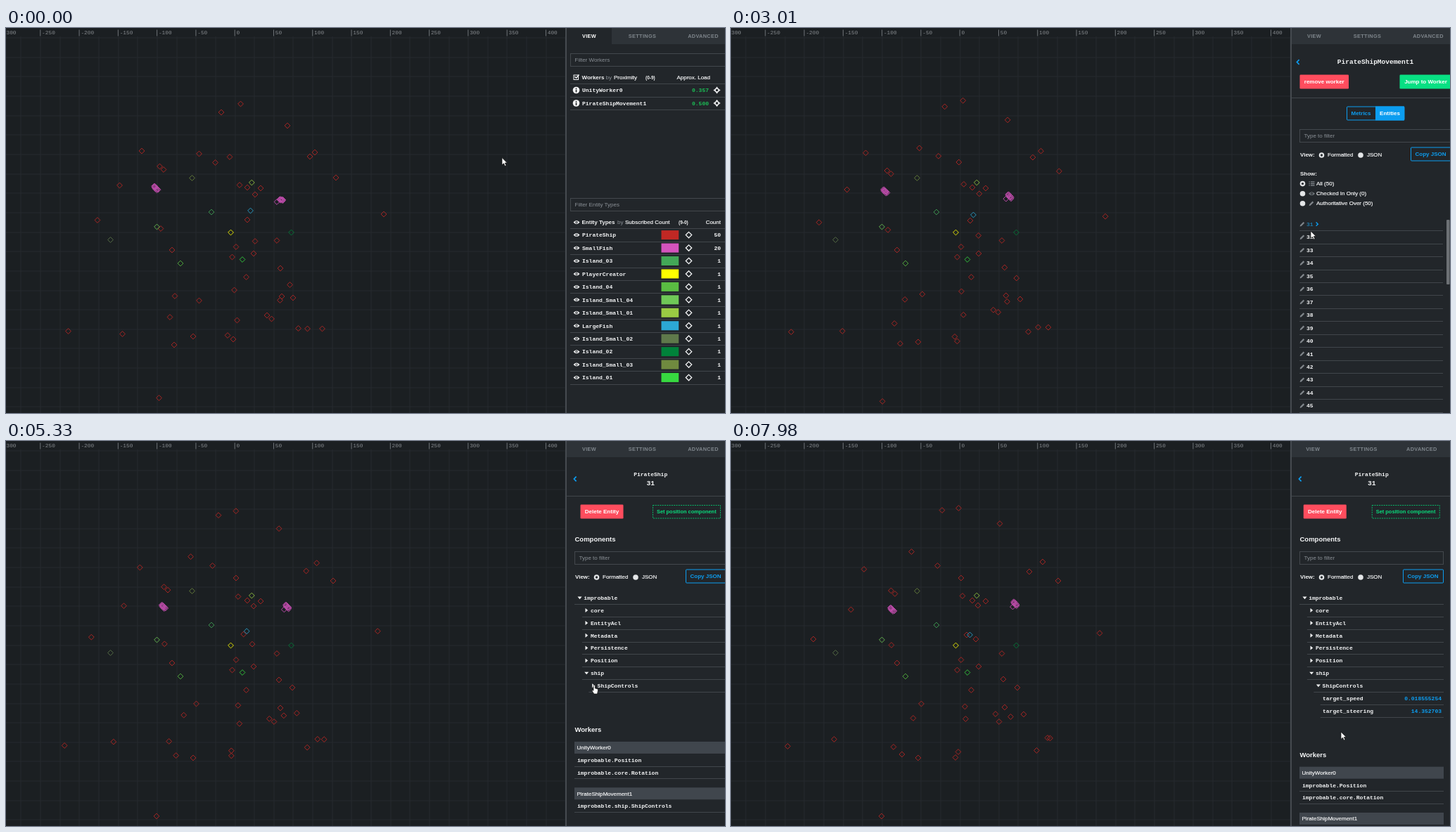
Recreate the animation shown at these times as an HTML page. Size 1022x548 px, loop 8 s.

```html
<!DOCTYPE html>
<html lang="en">
<head>
<meta charset="utf-8">
<title>World inspector</title>
<style>
html, body { margin: 0; width: 100%; height: 100%; overflow: hidden; background: #1b1f22; }
svg { display: block; width: 1022px; height: 548px; }
text { font: 8px "Liberation Sans", Arial, sans-serif; fill: #f4f5f6; white-space: pre; }
.b { font-weight: bold; }
.m { font-family: "Liberation Mono", "Courier New", monospace; }
.s { stroke: #f4f5f6; stroke-width: .2px; }
.e { text-anchor: end; }
.c { text-anchor: middle; }
.tab { font-size: 7.3px; letter-spacing: .35px; font-weight: bold; }
</style>
</head>
<body>
<svg id="stage" viewBox="0 0 1022 548"></svg>
<script>
const LOOP = 8000;
const BLUE = '#0c9df0', WHITE = '#f4f5f6', RULE = '#41464b', GREY = '#8a9096';
const stage = document.getElementById('stage');

// Markup helpers
const text = (x, y, s, cls = '', fill = '', size = 0) =>
  `<text x="${x}" y="${y + 2.8}" class="${cls}" style="${fill && `fill:${fill};`}${size ? `font-size:${size}px` : ''}">${s}</text>`;
const rect = (x, y, w, h, fill, extra = '') =>
  `<rect x="${x}" y="${y}" width="${w}" height="${h}" fill="${fill}" ${extra}/>`;
const rule = (x1, x2, y) => rect(x1, Math.round(y), x2 - x1, 1, RULE);
const path = (x, y, d, extra) => `<path transform="translate(${x} ${y})" d="${d}" ${extra}/>`;
const line = (color, w = 1) => `fill="none" stroke="${color}" stroke-width="${w}"`;
const diamond = (x, y, r, color, w = 1) => path(x, y, `M0 ${-r}L${r} 0L0 ${r}L${-r} 0Z`, line(color, w));
const box = (x, y, w, h, color, extra = '') => rect(x + .5, y + .5, w - 1, h - 1, 'none', `stroke="${color}" ${extra}`);
const range = (n, f) => Array.from({ length: n }, (_, i) => f(i)).join('');

const eye = (x, y, color = WHITE) =>
  path(x, y, 'M-4.5 0Q0-5 4.5 0Q0 5-4.5 0Z', `fill="${color}"`) +
  `<circle cx="${x}" cy="${y}" r="1.7" fill="#22262a"/><circle cx="${x}" cy="${y}" r=".8" fill="${color}"/>`;
const info = (x, y) => `<circle cx="${x}" cy="${y}" r="4.8" fill="${WHITE}"/>` +
  rect(x - .8, y - 3, 1.6, 1.5, '#22262a') + rect(x - .8, y - .8, 1.6, 3.8, '#22262a');
const pencil = (x, y) => path(x, y, 'M-3.4 3.4L-2.8 1.2L1.6-3.2L3.2-1.6L-1.2 2.8Z', 'fill="#7f858a"');
const radio = (x, y, on) => `<circle cx="${x}" cy="${y}" r="3.8" fill="#e4e6e8"/>` +
  (on ? `<circle cx="${x}" cy="${y}" r="1.7" fill="#2c3034"/>` : '');
const target = (x, y) => path(x, y,
  'M0-5L2-2.8H-2ZM0 5L2 2.8H-2ZM-5 0L-2.8-2V2ZM5 0L2.8-2V2Z', `fill="${WHITE}"`) +
  `<circle cx="${x}" cy="${y}" r="2.4" ${line(WHITE, 1.3)}/>`;
const back = (x, y) => path(x, y, 'M1.6-3.4L-1.6 0L1.6 3.4', line(BLUE, 1.7));
const caret = (x, y, open) => path(x, y, open ? 'M-3-1.6H3L0 2Z' : 'M-1.7-3V3L2 0Z', `fill="${WHITE}"`);
const button = (x, y, w, s, fill) => rect(x, y, w, 20, fill, 'rx="1.3"') + text(x + w / 2, y + 9.5, s, 'b c', '#fff');
const input = (x, y, right, s) => box(x, y, right - x, 19, '#43484d') + text(x + 6.5, y + 9.5, s, '', GREY);

// Map backdrop
const STEP = 27.64, ZERO = 325.5;
const backdrop = () => rect(0, 0, 797, 548, '#1b1f22') +
  range(29, i => rect(Math.round(ZERO + (i - 11) * STEP) - .5, 12, 1, 536, '#272b2e')) +
  range(20, i => rect(0, Math.round(14.2 + i * STEP) - .5, 797, 1, '#272b2e')) +
  range(15, i => {
    const x = ZERO + (i - 6) * STEP * 2;
    return rect(x - .8, 2.5, 1, 9, '#6f7478') + text(x + 2, 6.5, (i - 6) * 50, 'm', '#85898d', 7.8);
  });

// Entity types: name, colour, place on the map
const TYPES = [
  ['PirateShip', '#c02824'], ['SmallFish', '#d453bd'], ['Island_03', '#43a857', [292, 262]],
  ['PlayerCreator', '#ffff00', [319.5, 291]], ['Island_04', '#5abd42', [248, 335]],
  ['Island_Small_04', '#6fc857', [214.5, 283]], ['Island_Small_01', '#9acb43', [349.3, 220]],
  ['LargeFish', '#2ca8d5', [347.5, 260]], ['Island_Small_02', '#5f794b', [148.5, 301.5]],
  ['Island_02', '#00823a', [405.5, 291]], ['Island_Small_03', '#708a3f', [264.5, 213.5]],
  ['Island_01', '#37d840', [336, 329.5]]
];
const colorOf = name => TYPES.find(type => type[0] == name)[1];

// Moving things
const mix = (a, b, k) => a + (b - a) * k;
const clamp = k => Math.max(0, Math.min(1, k));
const movers = [];

// Everything in a fleet shares one course, covered steadily until a given time
function fleet([dx, dy], starts, until = LOOP, type = 'PirateShip') {
  starts.forEach(([x, y]) => movers.push({
    type, color: colorOf(type),
    at: t => [x + dx * clamp(t / until), y + dy * clamp(t / until)]
  }));
}

// A shoal is a short slanted row of fish that turns as it swims
function shoal(count, from, to, slant) {
  for (let i = 0; i < count; i++) {
    const k = i / (count - 1) - .5, wob = Math.sin(i * 2.2) * .7;
    movers.push({ type: 'SmallFish', color: colorOf('SmallFish'), at: t => [
      mix(from[0], to[0], t / LOOP) + k * 5 + wob,
      mix(from[1], to[1], t / LOOP) + k * mix(slant, 5, clamp(t / 3000)) - wob
    ] });
  }
}

const HALT = 4600;
fleet([0, 0], [[236, 316], [343, 227], [362, 228], [385, 302.5], [327, 311.5], [352, 321], [321.5, 326], [341.5, 354.5]]);
fleet([-3, -3], [[332, 223.5], [390, 342], [392, 382], [354, 237]]);
fleet([-10, -12.5], [[333.5, 108]]);
fleet([-6, -21.5], [[306, 120], [354, 303.5]]);
fleet([-18, -21.5], [[400, 139], [274.5, 179]]);
fleet([9, 16], [[218.5, 197], [224, 201.5], [161.5, 224]]);
fleet([-13, 8.5], [[537, 265], [130, 273.5]]);
fleet([-8, 3], [[432, 183], [343, 273], [88.5, 431.5]]);
fleet([8, 5], [[324.5, 373], [389.5, 387.5], [220, 285.5], [408, 384], [315, 437.5]]);
fleet([-4, 7.5], [[193, 175], [323, 443]]);
fleet([5, -20.5], [[371, 409], [328.5, 416]]);
fleet([19, 13], [[240, 381.5], [415.5, 427.5]]);
fleet([21.5, -5.5], [[428.5, 428]]);
fleet([-19, -11], [[165.5, 435.5]]);
fleet([-2, 24], [[233, 411.5]]);
fleet([4, -5], [[439, 177], [239, 451], [449.5, 428]]);
fleet([-4, -14], [[297.5, 191.5], [469, 213], [274.5, 388]], HALT);
fleet([3.5, -14.5], [[403.5, 365.5], [377.5, 414]], HALT);
fleet([9, 11.5], [[318, 183.5]], HALT);
fleet([0, 12], [[266, 439]], HALT);
fleet([-3.5, 7.5], [[217.5, 526.5]], HALT);
TYPES.forEach(([name, , at]) => at && fleet(name == 'LargeFish' ? [-8, 16] : [0, 0], [at], LOOP, name));
fleet([15.5, -11.5], [[385, 247.5]], LOOP, 'SmallFish');
shoal(10, [213, 228], [229, 240], 5.5);
shoal(9, [391.5, 244.5], [404, 231.5], 1);
const count = name => movers.filter(m => m.type == name).length;

// Side panel pieces; slim layouts leave room for a scrollbar
function frame(slim, active) {
  const d = slim ? 11 : 0, tint = '#7f868c';
  return rect(795, 0, 2, 548, '#454a4f') + rect(797, 0, 225, 548, '#22262a') +
    rect(797, 0, 225, 23, '#2e3338') + (active ? rect(797, 0, 64, 23, '#22262a') : '') +
    ['VIEW', 'SETTINGS', 'ADVANCED'].map((s, i) =>
      text(829 + i * 75.5 + (i > 1 ? 11 : 0) - d * (2 * i + 1) / 6, 11, s, 'tab c', active && !i ? '#fff' : tint)).join('');
}

function filterBar(y, right) {
  return input(808, y, right, 'Type to filter') +
    text(809, y + 36.5, 'View:', 'b') + radio(839.5, y + 37, true) + text(848, y + 36.5, 'Formatted', 's') +
    radio(895, y + 37) + text(904, y + 36.5, 'JSON', 's') +
    box(right - 58, y + 25.5, 58, 20, BLUE, 'rx="1"') + text(right - 29.5, y + 35.5, 'Copy JSON', 'b c', BLUE);
}

function overview() {
  const worker = (y, name, load) => info(810.5, y) + text(819, y, name, 'm b') +
    text(999, y, load, 'm b e', '#1cbd56') + target(1010.5, y) + rule(802, 1022, y + 9);
  const heading = (y, title, by, order, total) =>
    text(818.5, y, title, 'b') + text(title == 'Workers' ? 852.5 : 869, y, 'by', '', GREY) +
    by + text(order, y, total ? '(9-0)' : '(0-9)', 'b', '', 6.5) + rule(802, 1022, y + 9);
  return frame(false, true) +
    input(802, 36, 1024, 'Filter Workers') +
    box(806.5, 66.5, 7.5, 7.5, WHITE) + path(810.5, 69.5, 'M-2-.4L0 1.8L4-3', line(WHITE, 1.4)) +
    heading(70, 'Workers', text(864, 70, 'Proximity', 's') + text(1001, 70, 'Approx. Load', 's e'), 909) +
    worker(88.5, 'UnityWorker0', '0.357') + worker(107, 'PirateShipMovement1', '0.500') +
    input(802, 242, 1024, 'Filter Entity Types') + eye(811, 276.5) +
    heading(276, 'Entity Types', text(880, 276, 'Subscribed Count', 's') + text(1016, 276, 'Count', 's e'), 956, true) +
    range(TYPES.length, i => {
      const [name, color] = TYPES[i], y = 294.6 + i * 18.45;
      return eye(811, y) + text(819, y, name, 'm b') + rect(931.5, y - 6.5, 24.7, 13, color) +
        diamond(970.5, y, 4.2, WHITE, 1.3) + text(1016, y, count(name), 'm b e') + rule(802, 1022, y + 9);
    });
}

function workerPage(entities) {
  const tab = (x, s, on) => rect(x, 111.5, 41, 20, on ? BLUE : 'none') +
    text(x + 20.5, 121.5, s, 'b c', on ? '#fff' : BLUE);
  return frame() + back(806, 48.5) + text(916, 48, 'PirateShipMovement1', 'm b c', '', 9.5) +
    button(808.5, 66.5, 69.5, 'remove worker', '#ff4d5e') + button(950.5, 66.5, 74, 'Jump to Worker', '#08e083') +
    rule(797, 1022, 99) + box(875, 111.5, 82.5, 20, BLUE, 'rx="1"') +
    tab(875, 'Metrics', !entities) + tab(916, 'Entities', entities) + filterBar(144, 1024) +
    (entities ? entityList() : metrics());
}

function metrics() {
  return caret(815.5, 210, true) + text(821, 210, 'Position', 'm b') + rule(808, 1022, 219) +
    range(3, i => {
      const y = 228.3 + i * 17.85;
      return text(822, y, 'xyz'[i], 'm b') + text(1021, y, i == 1 ? 0 : 'undefined', 'm b e', BLUE) + rule(819, 1022, y + 8.5);
    });
}

function entityList() {
  const listIcon = range(3, i => rect(821.5, 218.5 + i * 2.5, 1.3, 1.2, GREY) + rect(824, 218.5 + i * 2.5, 5.5, 1.2, GREY));
  return text(809, 207, 'Show:', 'b') + listIcon + eye(825.5, 235.8, '#6f757a') + pencil(825, 249.8) +
    ['All (50)', 'Checked In Only (0)', 'Authoritative Over (50)'].map((s, i) =>
      radio(812.5, 221.6 + i * 14.1, !i) + text(832, 221.3 + i * 14.1, s, 's')).join('') +
    range(15, i => {
      const y = 279.2 + i * 18.45;
      return pencil(812, y) + (i ? text(818, y, 31 + i, 'm b') : '') + rule(808, 1012, y + 9);
    }) +
    `<g id="plain">${text(818, 279.2, 31, 'm b')}</g>` +
    `<g id="hover">${text(818, 279.2, 31, 'm b', '#1d78a8')}${path(833, 279.2, 'M-1.4-2.6L1.3 0L-1.4 2.6', line(BLUE, 1.4))}</g>` +
    rect(1017, 273, 4.5, 92, '#6d7175', 'rx="1"');
}

function entityPage(depth) {
  const slim = depth > 1, d = slim ? 11 : 0, right = 1024 - d, mid = 916.2 - d / 2;
  const rows = [['improbable', 0, 1], ...['core', 'EntityAcl', 'Metadata', 'Persistence', 'Position'].map(s => [s, 1]),
    ['ship', 1, depth > 0]];
  if (depth > 0) rows.push(['ShipControls', 2, slim]);
  if (slim) rows.push(['target_speed', 3, 0, '0.018555254'], ['target_steering', 3, 0, '14.352703']);
  const w = 330.3 + (rows.length - 7) * 17.85 + 63;
  const band = (y, s) => rect(808, y - 8.5, right - 808, 17, '#40464d') + text(811.5, y, s, 's');
  const item = (y, s) => text(812, y, s, 'm b') + rule(808, right, y + 8.5);
  return frame(slim) + back(809, 54) +
    text(mid, 47.5, 'PirateShip', 'm b c') + text(mid, 60, '31', 'm b c', '', 9.6) +
    rule(797, 1022, 77.5) + button(816.5 - d / 4, 90.5, 61, 'Delete Entity', '#ff4d5e') +
    box(919 - d * .75, 91, 97, 19.5, '#09b768', 'stroke-dasharray="2 1.3"') +
    text(967.3 - d * .75, 100, 'Set position component', 'b c', '#0adb7c', 7.45) +
    text(808.5, 140, 'Components', 'b', '', 9.5) + filterBar(157, right) +
    rows.map(([s, level, open, value], i) => {
      const y = 223.2 + i * 17.85, x = 815.5 + level * 9.7;
      return (value ? text(right - 3, y, value, 'm b e', BLUE) : caret(x, y, open)) +
        text(value ? 841 : x + 5.7, y, s, 'm b') + rule(level ? 809.5 + level * 9.4 : 808, right, y + 8.8);
    }).join('') +
    text(808.5, w, 'Workers', 'b', '', 9.5) + band(w + 25.3, 'UnityWorker0') +
    item(w + 43, 'improbable.Position') + item(w + 60.8, 'improbable.core.Rotation') +
    band(w + 90.6, 'PirateShipMovement1') + item(w + 108.2, 'improbable.ship.ShipControls');
}

// Which panel shows from which time
const pages = [
  { from: 0, body: overview() },
  { from: 1150, body: workerPage(false) },
  { from: 1920, body: workerPage(true) },
  { from: 3630, body: entityPage(0) },
  { from: 4950, body: entityPage(1) },
  { from: 5500, body: entityPage(2) }
];

// Pointer trips: start time, end time, destination
const HOME = [705, 184.5];
const trips = [
  [150, 530, [809, 107]], [1300, 1800, [936, 118]], [2500, 2770, [868, 230]], [2770, 3000, [824, 289]],
  [3150, 3450, [815, 282]], [4640, 4850, [824, 330]], [5000, 5250, [835, 348]], [5650, 6050, [867, 414]]
];
const smooth = k => k * k * (3 - 2 * k);
const pointer = t => trips.reduce((at, [from, to, goal]) => {
  const k = smooth(clamp((t - from) / (to - from)));
  return at.map((v, i) => mix(v, goal[i], k));
}, HOME);

const skin = 'fill="#fff" stroke="#111" stroke-width=".7"';
stage.innerHTML = backdrop() +
  `<g id="movers" opacity=".88">${movers.map(m => diamond(0, 0, 3.9, m.color)).join('')}</g>` +
  `<g id="pages">${pages.map(p => `<g>${p.body}</g>`).join('')}</g>` +
  `<path id="spinner" d="M-1.5-4A4.3 4.3 0 0 0 3.2 3" ${line(BLUE, 1.2)}/>` +
  `<g id="cursor"><path d="M0 0V10.4L2.5 8.2L4.2 12L6 11.2L4.3 7.6H7.4Z" ${skin}/>` +
  `<path d="M0 0Q1.3-1.6 2.4 0V4L5.8 4.9Q6.7 5.3 6.5 7L5.5 12H.8L-2 7.6Q-1.6 6 0 7.2Z" ${skin}/></g>`;

const $ = id => document.getElementById(id);
const shapes = [...$('movers').children], views = [...$('pages').children];
const [arrow, hand] = $('cursor').children;
const show = (el, on) => el.setAttribute('visibility', on ? 'inherit' : 'hidden');
const move = (el, [x, y], angle = 0) => el.setAttribute('transform', `translate(${x.toFixed(2)} ${y.toFixed(2)}) rotate(${angle})`);

function draw(t) {
  movers.forEach((m, i) => move(shapes[i], m.at(t)));
  const page = pages.filter(p => t >= p.from).length - 1;
  views.forEach((v, i) => v.setAttribute('display', i == page ? 'inline' : 'none'));
  const hovered = t >= 2930;
  show($('hover'), hovered);
  show($('plain'), !hovered);
  show($('spinner'), t >= 6450 && t < 6950);
  move($('spinner'), [1010.8, 55], (t - 6740) * .36);
  move($('cursor'), pointer(t));
  const pointing = t >= 4800 && t < 5750;
  show(hand, pointing);
  show(arrow, !pointing);
}

const start = performance.now();
function tick() {
  draw((performance.now() - start) % LOOP);
  requestAnimationFrame(tick);
}
tick();
</script>
</body>
</html>
```
